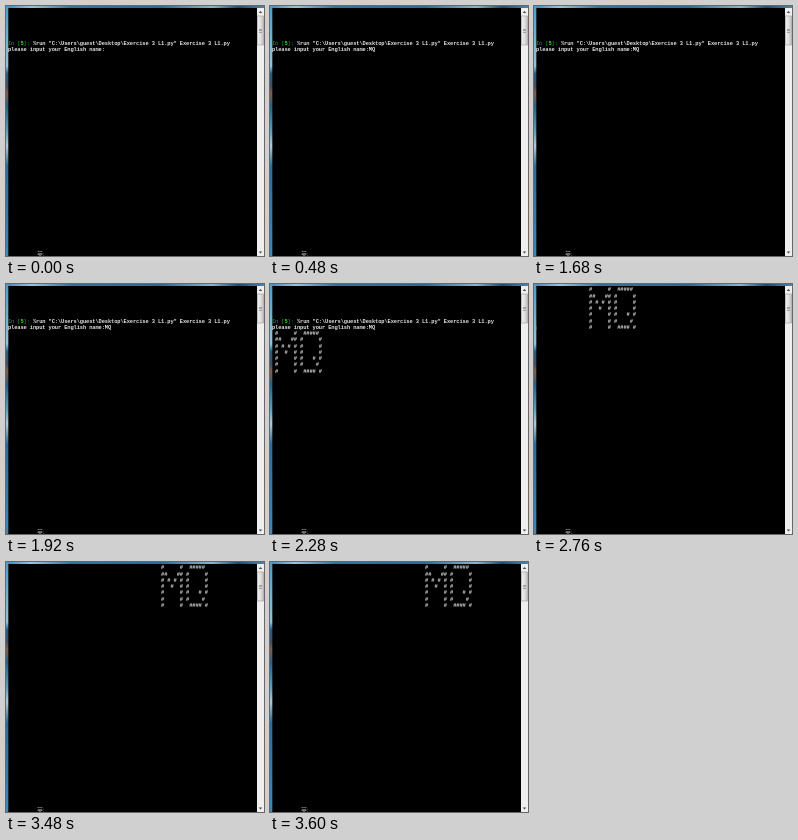
Recreate the animation shown at these times as an HTML page with a canvas. Size 258 by 250 pixels, loop 3720 ms.

```html
<!DOCTYPE html>
<html lang="en">
<head>
<meta charset="utf-8">
<style>
  html, body { margin: 0; width: 100%; height: 100%; overflow: hidden; background: #000; }
  canvas { display: block; }
</style>
</head>
<body>
<canvas id="stage" width="258" height="250"></canvas>
<script>
const ctx = document.getElementById('stage').getContext('2d');
const LOOP = 3720, CELL = 3.125, LINE = 6.25;
const BANNER = [
  '#     #  #####',
  '##   ## #     #',
  '# # # # #     #',
  '#  #  # #     #',
  '#     # #   # #',
  '#     # #    #',
  '#     #  #### #'
];

function box(x, y, w, h, color) {
  ctx.fillStyle = color;
  ctx.fillRect(x, y, w, h);
}

function gradient(x, y, w, h, horizontal, stops) {
  const fill = ctx.createLinearGradient(x, y, horizontal ? x + w : x, horizontal ? y : y + h);
  stops.forEach(([at, color]) => fill.addColorStop(at, color));
  box(x, y, w, h, fill);
}

// Text sits on the console's character grid.
function write(text, col, row, color = '#e4e4e4') {
  ctx.font = 'bold 5.4px "Liberation Mono", monospace';
  ctx.textAlign = 'center';
  ctx.textBaseline = 'alphabetic';
  ctx.fillStyle = color;
  [...text].forEach((char, i) =>
    ctx.fillText(char, 2 + (col + i + 0.5) * CELL, 7.3 + row * LINE));
}

function banner(col, row, lines = BANNER.length) {
  BANNER.slice(0, lines).forEach((line, i) => write(line, col, row + i));
}

function arrow(y, dir) {
  ctx.fillStyle = '#444';
  ctx.beginPath();
  ctx.moveTo(252.8, y);
  ctx.lineTo(256.2, y);
  ctx.lineTo(254.5, y + 2 * dir);
  ctx.fill();
}

function drawWindow() {
  gradient(0, 0, 258, 2, true, [
    [0, '#3f86b8'], [0.1, '#9cc4dc'], [0.25, '#33749f'], [0.6, '#2b6a98'],
    [0.8, '#8ab4cc'], [0.9, '#1d4a70'], [1, '#4b86ac']
  ]);
  gradient(0, 0, 2.5, 250, false, [
    [0, '#4c9ccc'], [0.24, '#8fc4e2'], [0.27, '#1d5f92'], [0.32, '#3a5068'],
    [0.35, '#8a5a44'], [0.4, '#24608e'], [0.5, '#5a9cc4'], [0.56, '#a8cce0'],
    [0.64, '#2c6c9c'], [1, '#3c88bc']
  ]);
  box(2.5, 2, 248.5, 248, '#000');

  box(251, 2, 7, 248, '#efefef');
  gradient(251.5, 10, 6, 29, true, [[0, '#f4f4f4'], [0.5, '#dedede'], [1, '#c2c2c2']]);
  ctx.strokeStyle = '#9a9a9a';
  ctx.lineWidth = 0.6;
  ctx.strokeRect(251.5, 10, 6, 29);
  [23, 24.5, 26].forEach(y => box(253, y, 3, 0.6, '#777'));
  arrow(7, -1);
  arrow(245.5, 1);

  ctx.font = '6px "Noto Sans CJK SC", "Noto Sans CJK", sans-serif';
  ctx.textAlign = 'left';
  ctx.fillStyle = '#b4b4b4';
  ctx.fillText('英:', 31, 250);
}

function drawPrompt(t) {
  write('In [', 0, 5, '#087a08');
  write('5', 4, 5, '#30e030');
  write(']:', 5, 5, '#087a08');
  write('%run "C:\\Users\\guest\\Desktop\\Exercise 3 L1.py" Exercise 3 L1.py', 8, 5);
  write('please input your English name:', 0, 6);

  const typed = t < 240 ? '' : t < 360 ? 'M' : 'MQ';
  write(typed, 31, 6);
  const cursorOn = (t >= 240 && t < 480) || (t >= 1080 && t < 1680);
  if (cursorOn) box(2 + (31 + typed.length) * CELL, 45, 3, 1, '#d8d8d8');
}

function draw(t) {
  drawWindow();
  if (t < 2760) {
    drawPrompt(t);
    if (t >= 2160) banner(1, 7, t < 2280 ? 4 : 7);
  } else {
    // The cleared screen shows the banner sliding right 16 columns at a time.
    banner(17 + 16 * Math.floor((t - 2760) / 360), 0);
  }
}

const start = performance.now();
function tick() {
  draw((performance.now() - start) % LOOP);
  requestAnimationFrame(tick);
}
tick();
</script>
</body>
</html>
```
